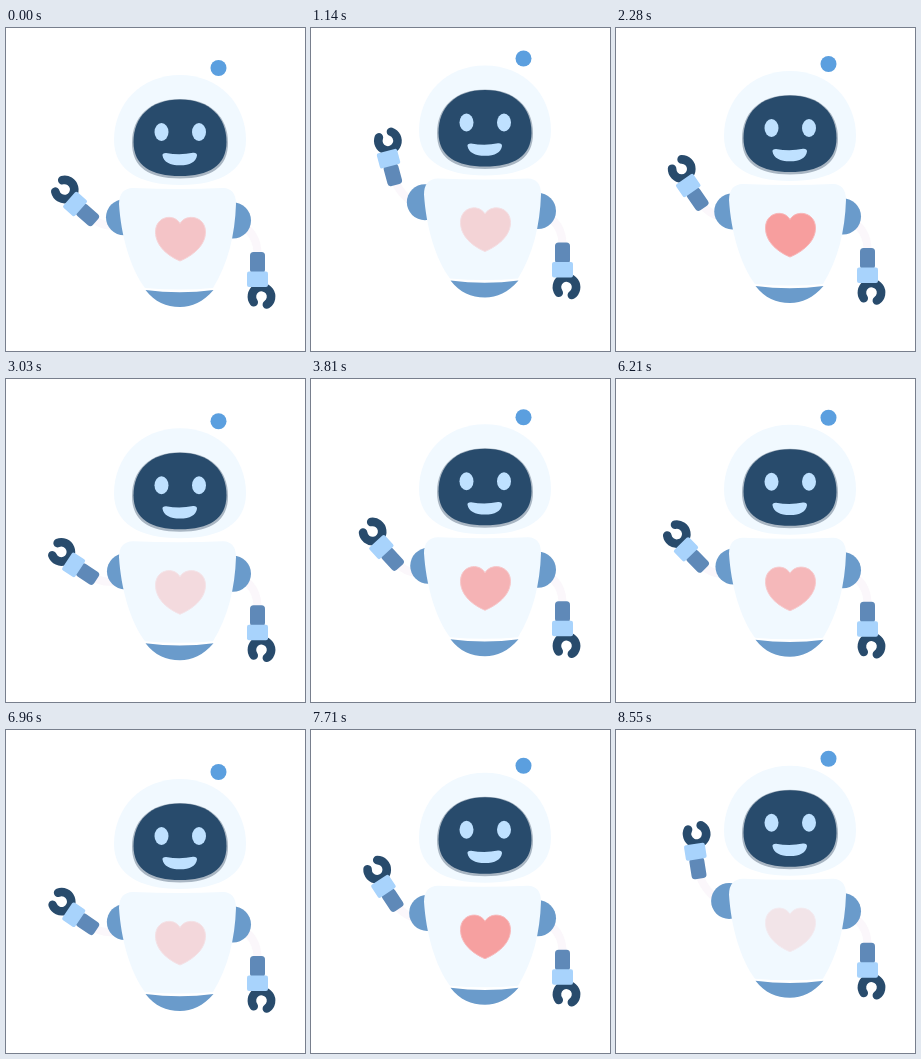
Animation, 299 px wide and 323 px high, one loop 8.58 s. Source, as an HTML page:

```html
<!DOCTYPE html>
<html lang="en">
<head>
<meta charset="utf-8">
<title>Waving robot</title>
<style>
  html, body { margin: 0; width: 100%; height: 100%; overflow: hidden; background: #fff; }
  svg { display: block; width: 299px; height: 323px; }
  .shell { fill: #f1f9ff; }
  .joint { fill: #6a9bcb; }
  .sleeve { fill: none; stroke: #fbf7fb; stroke-width: 8; }
  .glow { fill: #bfe1ff; }
</style>
</head>
<body>
<svg viewBox="0 0 299 323">
  <defs>
    <!-- Forearm pointing down, centred on its cuff -->
    <g id="forearm">
      <path id="claw" fill="none" stroke="#284b6c" stroke-width="8.6" stroke-linecap="round"/>
      <rect x="-7.5" y="-10" width="15" height="21" rx="3.5" fill="#5f89b8"/>
      <rect x="-10.5" y="9.5" width="21" height="15.500" rx="2" fill="#a8d3fc"/>
    </g>
    <path id="visor" d="M174 71.500C203.500 71.500 220.500 89 220.500 114C220.500 138 202.500 148 174 148C145.500 148 127.500 138 127.500 114C127.500 89 144.500 71.500 174 71.500Z"/>
  </defs>
  <g id="robot">
    <path id="sleeve" class="sleeve"/>
    <path class="sleeve" d="M251.500 230Q253 203 229 194"/>
    <circle id="shoulder" class="joint" r="18"/>
    <circle class="joint" cx="227" cy="192.500" r="18"/>
    <path class="joint" d="M139.500 262Q174 266.500 207.500 262C197 274 186 279 174 279C160 279 149 274 139.500 262Z"/>
    <path class="shell" d="M127 160Q174 162 217 160Q230 160.500 230 176C229 207 222 236 207 260Q174 263 139 260C124 240 115 207 113 176Q113 160.500 127 160Z"/>
    <path id="heart" fill="#f79e9e" stroke="#f8b8ba" stroke-linejoin="round" d="M174 233C162 228 149.500 218 149.500 204C149.500 188 168 185 174 195.500C180 185 199.500 188 199.500 204C199.500 218 186 228 174 233Z"/>
    <path class="shell" d="M174 47C213 47 240 76 240 112C240 142 215 157 174 157C133 157 108 142 108 112C108 76 135 47 174 47Z"/>
    <use href="#visor" y="1" fill="#a9b6c3" stroke="#a9b6c3" stroke-width="3"/>
    <use href="#visor" fill="#284b6c"/>
    <ellipse class="glow" cx="155.500" cy="104" rx="7" ry="9"/>
    <ellipse class="glow" cx="193" cy="104" rx="7" ry="9"/>
    <path class="glow" d="M156.500 127.500Q156 125 160 125Q174 127.500 187 124.800Q191 124.500 191 127.500C190 134 184 137.300 174 137.300C164 137.300 157.500 134 156.500 127.500Z"/>
    <circle cx="212.500" cy="40" r="8" fill="#5b9fdf"/>
    <use href="#forearm" x="251.500" y="234"/>
    <use id="arm" href="#forearm"/>
  </g>
</svg>
<script>
  const LOOP = 8580, STEP = 30, HALF = 1800, TOP_AT = 1380;
  const $ = id => document.getElementById(id);
  const set = (id, attrs) => {
    for (const key in attrs) $(id).setAttribute(key, attrs[key]);
  };
  const rad = deg => deg * Math.PI / 180;

  // Ring with an opening that faces away from the wrist
  function clawPath(cx, cy, r, facing, halfGap) {
    const at = deg => `${cx + r * Math.cos(rad(deg))} ${cy + r * Math.sin(rad(deg))}`;
    return `M${at(facing + halfGap)}A${r} ${r} 0 1 1 ${at(facing - halfGap)}`;
  }

  // 0 at the highest point of the float, 1 at the lowest
  function floatAt(t) {
    const u = ((t - TOP_AT + 2 * HALF) % (2 * HALF)) / HALF;
    return u < 1 ? u : 2 - u;
  }

  function draw(t) {
    const s = floatAt(t);
    const angle = 82 - 53 * s;
    const cuff = { x: 82, y: 149 + 60 * s - 13 * s * s };
    const joint = { x: 113 + 6.5 * s, y: 182 + 13 * s - 4.5 * s * s };
    const elbow = {
      x: cuff.x + 24 * Math.cos(rad(angle)),
      y: cuff.y + 24 * Math.sin(rad(angle))
    };
    set('robot', { transform: `translate(0 ${15 * s - 11.5})` });
    set('shoulder', { cx: joint.x, cy: joint.y });
    set('sleeve', { d: `M${cuff.x} ${cuff.y}Q${elbow.x} ${elbow.y} ${joint.x} ${joint.y + 6}` });
    set('arm', { transform: `translate(${cuff.x} ${cuff.y}) rotate(${angle - 90}) scale(1 -1)` });
    set('heart', { opacity: 1 - 1.6 * Math.abs(s - 0.5) });
  }

  set('claw', { d: clawPath(4, 34.6, 9.6, 100, 44) });
  const start = performance.now();
  function tick() {
    const t = (performance.now() - start) % LOOP;
    draw(Math.floor(t / STEP) * STEP);
    requestAnimationFrame(tick);
  }
  tick();
</script>
</body>
</html>
```
